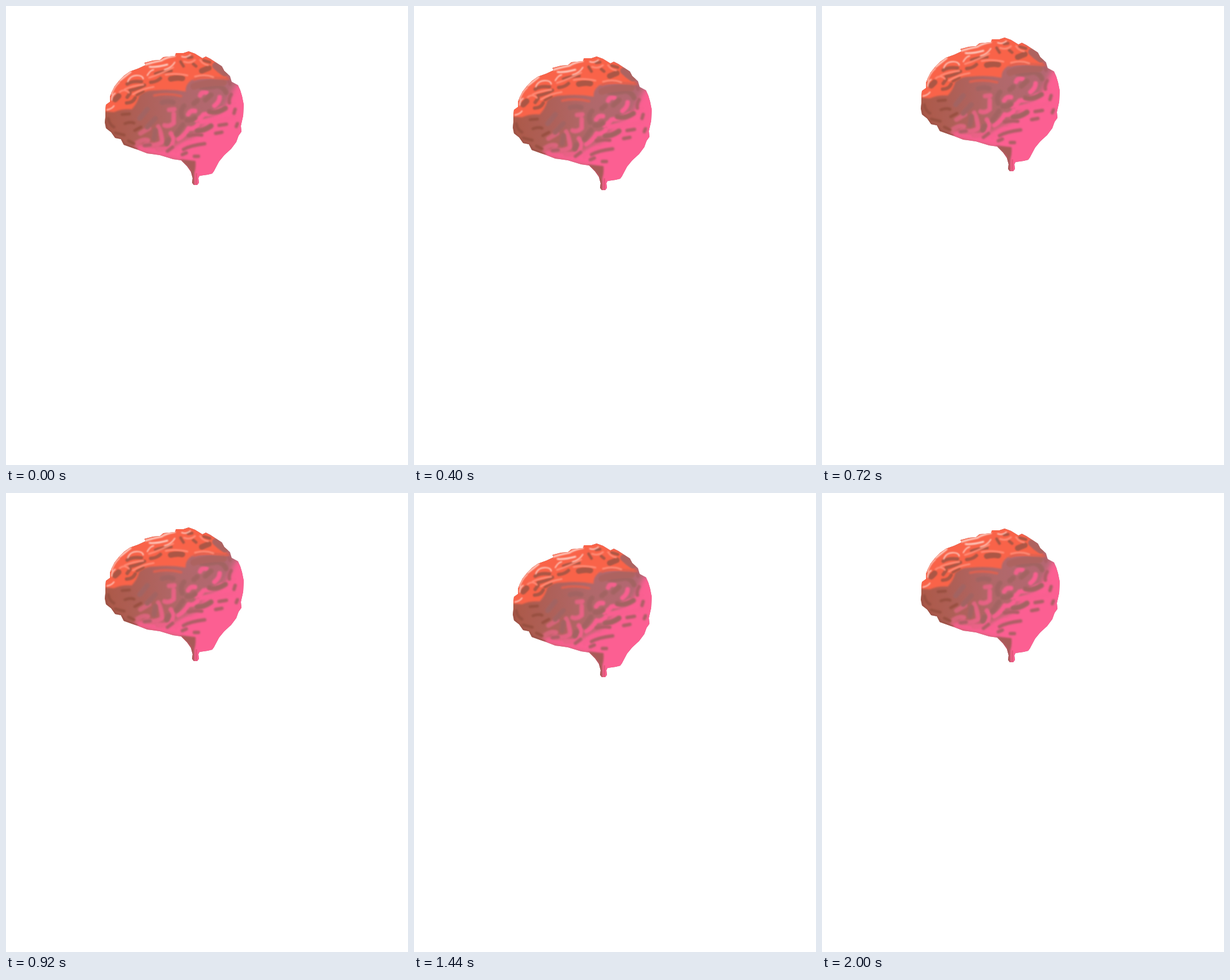
An HTML page for the animation above (2040 ms loop, 700 by 800 pixels).

```html
<!DOCTYPE html>
<html lang="en">
<head>
<meta charset="utf-8">
<title>Floating brain</title>
<style>
  html, body { margin: 0; width: 100%; height: 100%; overflow: hidden; background: #fff; }
  svg { display: block; width: 700px; height: 800px; }
  .line { fill: none; stroke-linecap: round; stroke-linejoin: round; }
</style>
</head>
<body>
<svg viewBox="0 0 700 800">
  <defs>
    <clipPath id="shape">
      <path d="M173 181L174 172L181 167L181 158L184 150L189 140L197 130L206 121L216 114L230 109L243 103L241 99L256 95L268 94L274 89L294 87L296 82L309 82L318 79L329 83L342 91L348 88L356 92L365 98L376 105L380 113L390 122L393 132L404 138L408 147L411 157L414 172L413 191L409 209L410 219L405 226L401 237L392 249L380 260L371 271L362 288L359 292L351 294L337 296L335 300L336 308L333 312L327 312L324 308L325 300L322 289L315 279L305 269L291 267L268 260L246 257L228 250L222 248L205 242L200 232L190 230L183 220L174 213L172 203L173 193Z"/>
    </clipPath>
    <linearGradient id="base" x1="0" y1="0" x2="1" y2="0">
      <stop offset="0" stop-color="#ac5846"/>
      <stop offset=".28" stop-color="#ae6058"/>
      <stop offset=".55" stop-color="#b0686a"/>
      <stop offset="1" stop-color="#b56776"/>
    </linearGradient>
    <linearGradient id="ridge" gradientUnits="userSpaceOnUse" x1="200" y1="175" x2="310" y2="235">
      <stop offset="0" stop-color="#b9605c"/>
      <stop offset=".5" stop-color="#d8647a"/>
      <stop offset="1" stop-color="#f95f90"/>
    </linearGradient>
    <filter id="soft1" x="-10%" y="-10%" width="120%" height="120%"><feGaussianBlur stdDeviation="1"/></filter>
    <filter id="soft2" x="-10%" y="-10%" width="120%" height="120%"><feGaussianBlur stdDeviation="1.7"/></filter>
    <filter id="soft5" x="-20%" y="-20%" width="140%" height="140%"><feGaussianBlur stdDeviation="5"/></filter>
  </defs>

  <g id="brain">
    <g clip-path="url(#shape)">
      <rect x="165" y="70" width="255" height="250" fill="url(#base)"/>

      <!-- lit zones -->
      <path fill="#f9634a" filter="url(#soft2)" d="M165 183L188 185Q201 179 219 180Q229 169 232 156Q243 146 260 147Q287 144 313 149Q311 138 323 129Q345 125 370 128L388 127L365 97L320 70L230 90L170 140Z"/>
      <path fill="#fc5f92" filter="url(#soft5)" d="M425 125L400 138L390 158L383 174Q361 190 347 199L328 226Q302 238 285 248L226 240L224 252L310 273L325 320L380 310L430 220Z"/>

      <!-- pink folds -->
      <g class="line" stroke="url(#ridge)" stroke-width="8" filter="url(#soft2)">
        <path d="M317 189Q321 181 329 183M331 199Q338 197 344 189Q360 188 374 180Q386 179 397 169"/>
        <path d="M340 202Q355 199 366 199Q379 198 397 193M363 174Q372 167 372 159M349 151Q340 149 338 156"/>
        <path d="M293 180L284 181M292 188L292 204Q284 211 276 208M300 232Q311 226 318 213Q327 216 334 207"/>
        <path d="M265 210Q271 222 272 237Q261 245 243 242M287 222Q294 229 288 243Q279 252 264 250"/>
        <path d="M234 222L249 213M227 240Q237 231 247 234M297 254Q305 243 318 239"/>
      </g>

      <!-- furrows in the middle and on the right -->
      <g class="line" stroke="#a26462" stroke-width="9" filter="url(#soft2)">
        <path d="M272 168Q283 165 291 168M246 180L233 196M260 196L246 211M310 174Q302 183 307 194M327 170L333 165M347 164L357 155"/>
        <path d="M354 184Q367 188 382 178M333 218Q346 217 357 209M308 207L297 223M283 233L280 240M260 217L258 231"/>
        <path d="M340 141Q355 143 369 139Q381 143 383 151M329 195Q324 199 315 199"/>
      </g>
      <g class="line" stroke="#ad5f66" stroke-width="6" filter="url(#soft2)">
        <path d="M392 154Q387 163 389 169M399 180L397 187M403 205L401 210M365 222L376 220M371 208L384 206M318 226Q330 223 341 225M309 250Q321 243 346 240"/>
        <path d="M241 243L251 242M281 253L290 246M307 259L314 256M328 262L335 262M386 127L390 136"/>
      </g>
      <g class="line" stroke="#98503f" stroke-width="5" filter="url(#soft2)">
        <path d="M178 196Q180 207 188 211M190 221L206 225M207 205Q216 201 223 204M202 189L215 188M224 217L235 211M213 235L223 240"/>
      </g>

      <!-- furrows in the red crown -->
      <g class="line" stroke="#ab5644" filter="url(#soft1)">
        <path stroke-width="10" d="M190 163L196 157M287 127Q298 124 307 126M341 113L353 108"/>
        <path stroke-width="6" d="M211 136Q220 130 236 132M216 147Q229 145 241 138M252 133Q263 132 269 126M211 159L216 152M210 169Q221 169 225 160"/>
        <path stroke-width="5" d="M260 118Q270 114 288 113M304 97L309 105M326 101L331 105M344 95L355 98M317 90L324 89M228 155L239 149"/>
        <path stroke="#ad6460" stroke-width="12" d="M365 104Q373 112 381 117M327 140Q346 133 379 133"/>
      </g>
      <g class="line" stroke="#df6150" stroke-width="4" filter="url(#soft2)">
        <path d="M258 156Q281 151 305 157M328 128Q344 120 363 125L387 127"/>
      </g>

      <!-- highlights -->
      <g class="line" stroke="#ff8b76" stroke-width="3" filter="url(#soft1)">
        <path d="M207 145Q220 139 239 137M249 125Q269 119 291 107M221 154Q237 144 257 141M278 120Q294 116 316 121M329 123Q347 118 361 124M198 150Q206 143 214 151M310 97Q321 101 329 94M338 94Q343 102 352 103"/>
      </g>
      <g class="line" stroke="#ffe3db" stroke-width="2" stroke-opacity=".85" filter="url(#soft1)">
        <path stroke-width="3" d="M243 102Q256 98 271 95Q280 89 294 87M250 106Q263 107 281 102M198 130L217 115"/>
        <path d="M184 154Q187 142 197 133M212 132Q216 121 228 121Q238 121 239 127M276 111Q288 108 294 98"/>
        <path d="M176 181Q185 179 188 174M184 164Q184 156 190 152M246 121Q251 112 257 111M306 88Q314 91 321 85"/>
      </g>

      <!-- shaded edges and stem -->
      <path class="line" stroke="#984f44" stroke-width="3" filter="url(#soft2)" d="M173 197L176 213L190 229L200 233L207 241L228 250"/>
      <path fill="#a85a59" filter="url(#soft2)" d="M303 267L330 270Q331 282 328 291L328 314L321 312L321 287Z"/>
      <path class="line" stroke="#e3587a" stroke-width="5" filter="url(#soft1)" d="M332 293L331 310"/>
    </g>
  </g>
</svg>
<script>
  const LOOP = 2040, STEP = 40;
  // [time in ms, vertical offset in px]
  const keys = [
    [0, 0], [130, 8], [270, 11], [400, 9], [560, -5], [640, -15],
    [720, -24], [810, -28], [940, -17], [1010, -8], [1120, 6], [1300, 11],
    [1440, 9], [1560, -1], [1680, -13.5], [1760, -21], [1870, -28], [2000, -17]
  ];
  const brain = document.getElementById('brain');

  function slope(i) {
    const a = keys[Math.max(i - 1, 0)], b = keys[Math.min(i + 1, keys.length - 1)];
    return (b[1] - a[1]) / (b[0] - a[0]);
  }

  // Cubic Hermite curve through the keys
  function offset(t) {
    let i = 0;
    while (i < keys.length - 2 && t >= keys[i + 1][0]) i++;
    const [t0, y0] = keys[i], [t1, y1] = keys[i + 1];
    const d = t1 - t0, u = (t - t0) / d, v = 1 - u;
    return v * v * ((1 + 2 * u) * y0 + u * d * slope(i))
         + u * u * ((1 + 2 * v) * y1 - v * d * slope(i + 1));
  }

  function draw(t) {
    const time = Math.floor((t % LOOP) / STEP) * STEP;
    brain.setAttribute('transform', `translate(0 ${Math.round(offset(time))})`);
  }

  const start = performance.now();
  function tick() {
    draw(performance.now() - start);
    requestAnimationFrame(tick);
  }
  tick();
</script>
</body>
</html>
```
